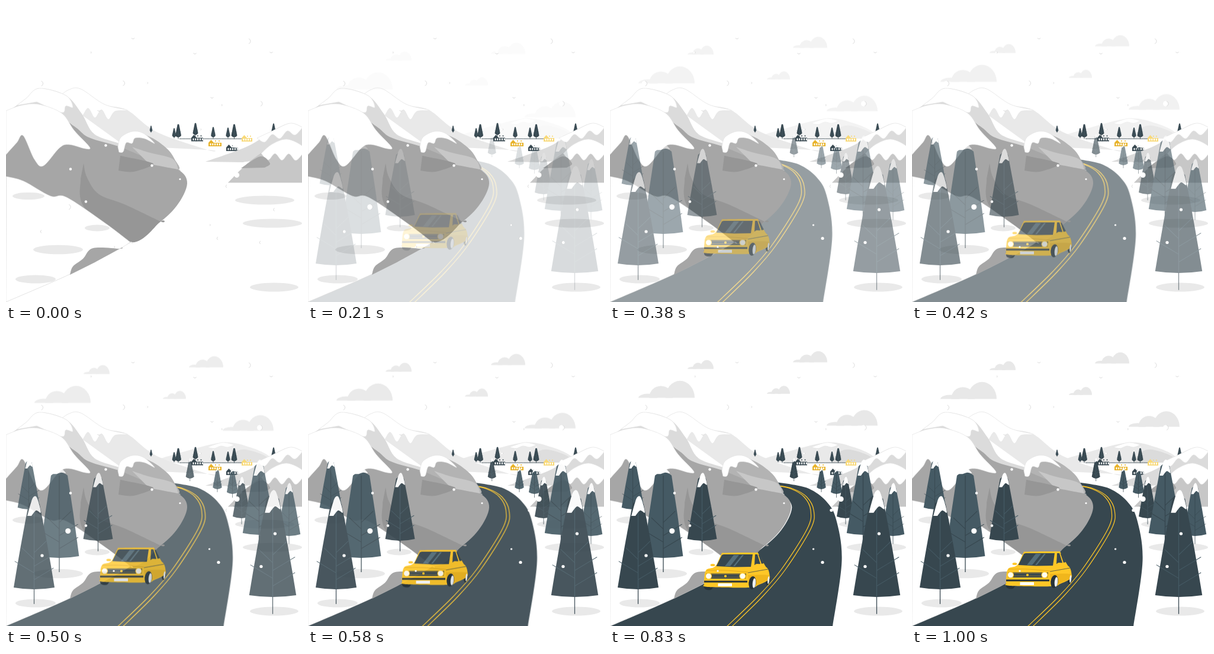
These frames come from a looping animation (500 px wide and 500 px high, 1.04 s). An HTML page with a canvas:

```html
<!DOCTYPE html>
<html lang="en">
<head>
<meta charset="utf-8">
<title>Winter road</title>
<style>
html, body { margin: 0; width: 100%; height: 100%; overflow: hidden; background: #fff; }
canvas { display: block; width: 500px; height: 500px; }
</style>
</head>
<body>
<canvas id="stage" width="500" height="500"></canvas>
<script>
const SIZE = 500, LOOP = 1040, FPS = 24, SLIDE = 30;
const DARK = '#37474f', SLATE = '#455a64', INK = '#263238', YELLOW = '#ffc727', SNOW = '#fff';
const EDGE = '#e3e3e3', PALE = '#e9e9e9', LIGHT = '#dbdbdb', SILVER = '#c7c7c7', GREY = '#a6a6a6', SHADE = '#969696';

// Where the left hills meet the road, from top to bottom.
const BANK = [291,276, 306,300, 288,338, 250,373, 190,411, 108,453, 0,500];
let g;

function layer(draw) {
  const c = document.createElement('canvas');
  c.width = c.height = SIZE;
  g = c.getContext('2d');
  draw();
  return c;
}

// Smooth curve through flat x,y pairs; a repeated point makes a corner.
function curve(p) {
  const last = p.length / 2 - 1;
  const at = i => { i = Math.max(0, Math.min(last, i)) * 2; return [p[i], p[i + 1]]; };
  g.beginPath();
  g.moveTo(p[0], p[1]);
  for (let i = 0; i < last; i++) {
    const [a, b, c, d] = [at(i - 1), at(i), at(i + 1), at(i + 2)];
    g.bezierCurveTo(b[0] + (c[0] - a[0]) / 6, b[1] + (c[1] - a[1]) / 6,
      c[0] - (d[0] - b[0]) / 6, c[1] - (d[1] - b[1]) / 6, c[0], c[1]);
  }
}

function blob(color, p, edge) {
  curve(p);
  g.closePath();
  g.fillStyle = color;
  g.fill();
  if (edge) { g.strokeStyle = edge; g.lineWidth = 0.7; g.stroke(); }
}

function line(color, width, p) {
  curve(p);
  g.strokeStyle = color;
  g.lineWidth = width;
  g.stroke();
}

function poly(color, p) {
  g.beginPath();
  for (let i = 0; i < p.length; i += 2) g.lineTo(p[i], p[i + 1]);
  g.closePath();
  g.fillStyle = color;
  g.fill();
}

function oval(color, x, y, rx, ry = rx, tilt = 0) {
  g.beginPath();
  g.ellipse(x, y, rx, ry, tilt, 0, Math.PI * 2);
  g.fillStyle = color;
  g.fill();
}

function rect(color, x, y, w, h) {
  g.fillStyle = color;
  g.fillRect(x, y, w, h);
}

// Wavy snow line from a to b with every second point hanging lower.
function drip(ax, ay, bx, by, n, depth) {
  const p = [];
  for (let i = 0; i <= n; i++) {
    const u = i / n;
    p.push(ax + (bx - ax) * u, ay + (by - ay) * u + (i % 2) * depth);
  }
  return p;
}

// Snow on a ridge: smooth on top, dripping back from its end to its start.
function cap(ridge, n, depth) {
  const [bx, by] = ridge.slice(-2);
  blob(SNOW, [...ridge, ...drip(bx, by, ridge[0], ridge[1], n, depth)], EDGE);
}

// Proportions follow the height, so a tree is its axis, top and base.
function tree(x, top, base, color, snow = 0.9, tip = 0.27) {
  const h = base - top, w = h * 0.227, tw = w * tip, y = top + h * 0.06, mid = (y + base) / 2;
  const other = color === DARK ? SLATE : DARK, thick = w > 22 ? 1.3 : 0.8;
  const bulge = (w + tw) / 2 + w * 0.04;
  g.beginPath();
  g.moveTo(x - tw, y);
  g.quadraticCurveTo(x, top - h * 0.02, x + tw, y);
  g.quadraticCurveTo(x + bulge, mid, x + w, base - 2);
  g.quadraticCurveTo(x, base + 4, x - w, base - 2);
  g.quadraticCurveTo(x - bulge, mid, x - tw, y);
  g.fillStyle = color;
  g.fill();
  line(other, thick, [x, y, x, base]);
  line(DARK, thick, [x, base, x, base + h * 0.17]);
  for (let i = 0; i < 5; i++) {
    const from = 0.9 - i * 0.075, reach = w * (i < 3 ? 0.95 : 0.6) * (i % 2 ? -1 : 1);
    line(other, thick * 0.8, [x, top + h * from, x + reach, top + h * (from - 0.13)]);
  }
  const drop = [-.5,1, -.3,.45, -.08,0, .2,0, .5,.8, .15,.7, -.2,1];
  blob(SNOW, drop.map((v, i) => i % 2 ? top - 2 + v * w * snow : x + v * w * 0.66));
}

function house(color, x, y, w) {
  poly(color, [x, y - 6, x + 4.5, y - 11, x + 9, y - 6, x + 9, y, x, y]);
  rect(color, x + 8, y - 6, w - 8, 6);
  for (let i = x + 2.5; i < x + w - 2; i += 3.8) rect(SNOW, i, y - 5, 2, 3.4);
  for (const u of [0.5, 0.78]) rect(color, x + w * u, y - 10, 1.8, 1.8);
}

function drawFar() {
  blob(PALE, [240,224, 295,207, 366,190, 412,198, 445,214, 430,224]);
  blob(LIGHT, [375,224, 385,208, 405,202, 440,214, 430,224]);
  cap([340,198, 366,190, 386,194], 4, 3);
}

function drawBack() {
  // two far left ridges
  const ridge = [88,155, 105,142, 126,140, 166,166, 205,176];
  blob(PALE, [...ridge, 255,213, 340,243, 340,243, 200,236]);
  blob(SNOW, [...ridge, ...drip(184,178, 116,170, 6, 15)], EDGE);
  const peak = [18,168, 34,156, 56,139, 101,151];
  blob(LIGHT, [0,180, ...peak, 128,182, 150,217, 200,238, 120,250]);
  blob(SNOW, [...peak, 113,171, 101,169, 94,180, 52,162], EDGE);

  for (const [x, h, ground = 221] of [[245,10,212], [284,15], [291,22], [320,20,217], [350,17], [375,16], [385.5,22], [452,16,214]])
    tree(x, ground - h, ground, DARK, 0.3);
  line(DARK, 0.8, [293,224.3, 415,224.3]);
  house(DARK, 313, 228.5, 20);
  house('#e8b32a', 342, 237, 22);
  house('#f8d978', 398, 229, 18);
  house(DARK, 372, 245, 20);
  poly(SNOW, [381,232, 394,232, 394,240, 384,239]);

  // right hills
  blob(LIGHT, [337,263, 408,237, 450,211, 480,198, 501,205, 501,205, 501,245, 400,264]);
  cap([424,223, 450,211, 480,198, 501,205], 6, 10);
  blob(SILVER, [375,298.5, 409,265, 452,234, 475,225, 501,237, 501,237, 501,298.5, 501,298.5]);
  cap([431,249, 450,233, 475,225, 501,237, 501,250], 6, 11);
  blob(GREY, [397,274, 430,254, 446,266, 437,273]);
  for (const [x, y, w] of [[437,328,50], [450,367,50], [453,475,41]]) oval(PALE, x, y, w, 7.5);
}

function drawRoad() {
  const left = BANK.map((v, i) => i % 2 ? v : v - 0.7);
  blob(DARK, [278,257, ...left, 0,501, 0,501, 374,501, 374,501, 389.5,390, 380,320, 363,289, 334,268, 300,260]);
  const stripe = [274,262, 303,268, 326,282, 337,305, 331,336, 287,405, 247,451, 194,502];
  for (const side of [0, 1])
    line(YELLOW, 1.2, stripe.map((v, i) => i % 2 ? v : v + side * (2.5 + i * 0.45)));
}

function drawHills() {
  blob(GREY, [0,180, 60,168, 115,203, 140,222, 190,237, 245,256, ...BANK]);
  blob(SHADE, [131,266, 137,290, 157,318, 200,335, 261,364, 261,364, 210,399, 133,341, 126,292]);
  // second summit
  blob('#b3b3b3', [198,240, 215,214, 245,222, 272,241, 285,259, 291,276, 245,260]);
  blob(SILVER, [213,238, 240,247, 281,258, 291,276, 291,276, 242,267]);
  blob(SHADE, [193,253, 240,263, 247,269, 215,280, 190,278, 190,278]);
  blob(SNOW, [189,238, 194,222, 213,212, 232,215, 251,232, 234,224, 218,223, 213,232, 203,231, 198,246, 191,247], EDGE);
  // main snow cap
  blob(SNOW, [0,177, 25,168, 55,166, 94,181, 115,210, 141,238, 134,241, 106,234, 90,240, 63,270, 48,259, 29,219, 18,231, 0,251, 0,251], EDGE);
  // snowy slope
  blob(SNOW, [0.4,288, 30,296, 75,321, 102,323, 165,365, 210,399, 210,399, ...BANK.slice(-6)], EDGE);
  blob(GREY, [108,454, 113,440, 130,427, 147,409, 192,410, 192,410, 150,433]);
  for (const [x, y, w] of [[38,321,27], [88,411.5,42], [154,375,21], [50,461.5,34]])
    oval(PALE, x, y, w, 3 + w * 0.115);
}

function drawTrees() {
  tree(38.5, 219, 302, SLATE);
  tree(90, 237, 384, SLATE, 0.25, 0.42);
  tree(155.5, 245, 355, DARK);
  tree(47.5, 285, 437, DARK);
  tree(310.7, 219, 250, DARK);
  tree(357, 234, 268, SLATE);
  tree(382.5, 234, 276, SLATE);
  tree(398, 251, 317, DARK);
  tree(427.5, 223, 345, SLATE);
  tree(478, 262, 347, SLATE);
  tree(450.5, 275, 450, DARK);
}

function drawCar() {
  g.translate(158, 374);
  // far wheel and underside
  blob(INK, [1,50, 2,61, 12,63, 17,57]);
  oval(INK, 108.5, 46, 3.6, 9, 0.1);
  // body
  blob(YELLOW, [2,35, 6,28, 20,23, 30,3, 36,0.5, 86,0, 93,2, 104,22, 109,28, 111.5,38, 110,46, 92,55, 78,59, 7,58, 1,53, 1,45]);
  blob('#f0b61c', [75,38, 108,38, 110,45, 90,55, 78,59]);
  // glass
  poly(DARK, [21.5,23, 31,4, 34,3, 83,3, 80,24, 52,24.5]);
  for (const [x, w] of [[36,9], [50,3]]) poly('#546e7a', [x, 23, x + 15, 4, x + 15 + w, 4, x + w, 23]);
  poly(DARK, [87,3, 91,3, 96,19, 86,21]);
  poly(DARK, [92.5,3, 95,4, 102,18, 98,19]);
  line(DARK, 0.8, [75,34, 92,31, 109,28]);
  line('#c99412', 0.6, [5,30, 37,30, 75,33]);
  for (const x of [15.5, 91]) oval(YELLOW, x, 21, 4, 2);
  // front
  poly(DARK, [4,35.5, 72,35.5, 71,44, 4,44]);
  for (const y of [37, 41.5]) line('#a58232', 0.7, [13,y, 61,y]);
  for (const x of [8.5, 66]) {
    oval(YELLOW, x, 39.7, 5.6);
    oval('#fffdf1', x, 39.7, 4.5);
  }
  oval(YELLOW, 37, 39.8, 2.1);
  rect(INK, 1, 47.5, 73, 3);
  rect(SNOW, 24.5, 52, 23.5, 5);
  // near wheels
  oval(INK, 82.5, 51, 6.2, 11, 0.12);
  oval('#eceff1', 85.5, 51.5, 2.7, 8.3, 0.1);
  oval('#eceff1', 109.7, 46.5, 1.5, 6.5, 0.08);
}

// Three half ellipses on a flat base, growing to the right.
function cloud(x, base, w, h) {
  g.fillStyle = '#e8e8e8';
  for (const [u, r, rise] of [[.17, .17, .24], [.4, .21, .7], [.74, .26, 1]]) {
    g.beginPath();
    g.ellipse(x + u * w, base, r * w, rise * h, 0, Math.PI, Math.PI * 2);
    g.fill();
  }
}

function drawClouds() {
  for (const [x, y, w] of [[131,67.7,44], [309,56.5,58], [48,116.5,95], [265,109.7,39], [366,163.5,86]])
    cloud(x, y, w, 3 + w * 0.27);
}

function flake(x, y, r, turn) {
  const a = turn * Math.PI / 2;
  oval(SNOW, x, y, r);
  g.beginPath();
  g.arc(x, y, r, a - 1.2, a + 1.2);
  g.strokeStyle = '#c4c4c4';
  g.lineWidth = 0.6;
  g.stroke();
}

function drawSnow() {
  const big = [[408.5,59.5], [58,131], [196,130.5], [428.5,165], [390,285.5], [104.7,339.5]];
  const mid = [[214.5,53], [319,78.5], [448,76.5], [348,153], [157,175], [374,304.5], [454.5,344], [61,381], [431,399.5], [359,392.5]];
  const tiny = [[142.5,78.5], [238,130], [363.5,167.5], [328,208.5], [294,292.5], [343.5,370], [182,407]];
  for (const [x, y] of big) flake(x, y, 4.5, 0);
  for (const [x, y] of mid) flake(x, y, 2.6, y < 200 ? 1 : 2);
  for (const [x, y] of tiny) flake(x, y, 1.6, 0);
  for (const [x, y] of [[168.5,235.5], [246.5,269.5], [109,275.5], [135,330.5]]) oval(SNOW, x, y, 2.2);
}

// Cubic bezier timing (.36, -.01, .5, 1.38): overshoots, then settles.
function ease(t) {
  if (t >= 1) return 1;
  const bez = (s, a, b) => 3 * s * (1 - s) * (1 - s) * a + 3 * s * s * (1 - s) * b + s * s * s;
  let lo = 0, hi = 1;
  for (let i = 0; i < 30; i++) {
    const mid = (lo + hi) / 2;
    if (bez(mid, 0.36, 0.5) < t) lo = mid; else hi = mid;
  }
  return bez(lo, -0.01, 1.38);
}

const [far, back, road, hills, trees, car, clouds, snow] =
  [drawFar, drawBack, drawRoad, drawHills, drawTrees, drawCar, drawClouds, drawSnow].map(layer);
const ctx = document.getElementById('stage').getContext('2d');

function put(img, alpha = 1, dx = 0, dy = 0) {
  ctx.globalAlpha = alpha;
  ctx.drawImage(img, dx, dy);
}

function render(ms) {
  const step = Math.min(24, Math.floor((ms % LOOP + 4) * FPS / 1000));
  const p = step < 2 ? 0 : ease(step / FPS + 0.02);
  const alpha = Math.max(0, Math.min(1, p)), off = SLIDE * (1 - p);
  ctx.globalAlpha = 1;
  ctx.fillStyle = SNOW;
  ctx.fillRect(0, 0, SIZE, SIZE);
  put(far, alpha);
  put(back);
  put(road, alpha, -off, 0);
  put(hills);
  put(trees, alpha);
  put(car, alpha, 0, -off);
  put(clouds, alpha, 0, off);
  put(snow);
}

const start = performance.now();
function tick() {
  render(performance.now() - start);
  requestAnimationFrame(tick);
}
tick();
</script>
</body>
</html>
```
